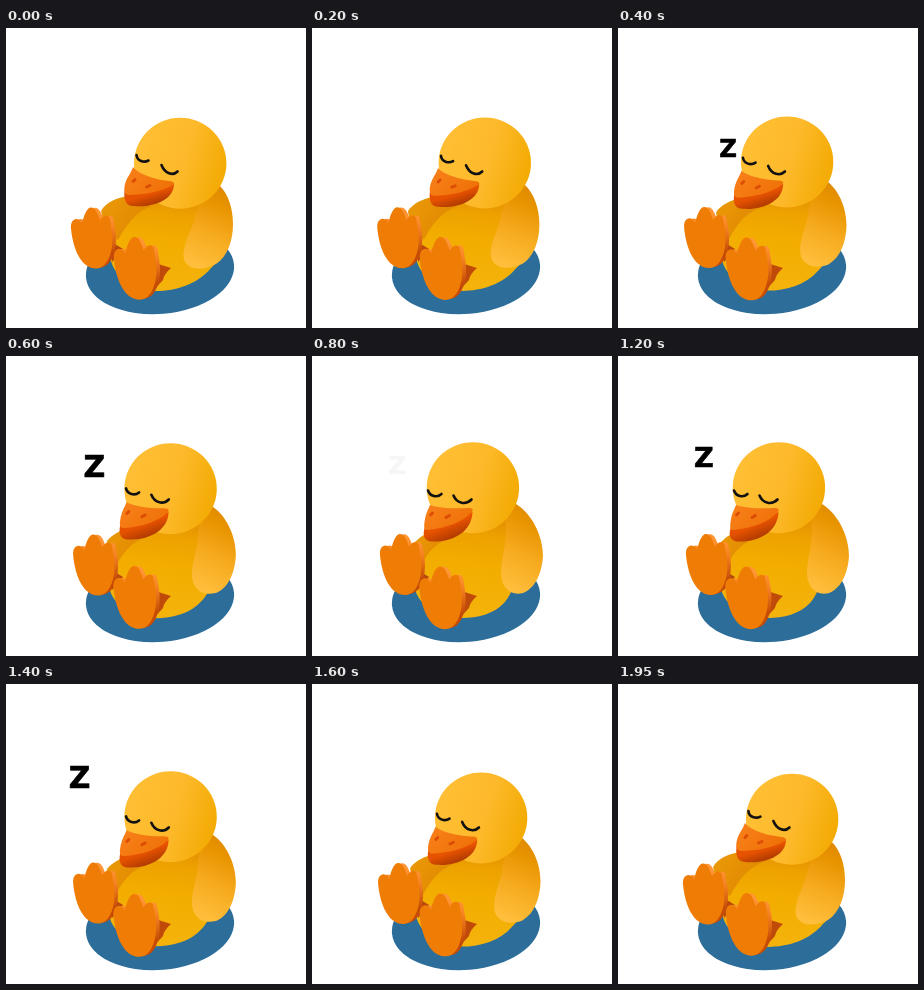
Write an HTML page that moves like this. It is 300x300 px and loops after 2000 ms.

```html
<!DOCTYPE html>
<html lang="en">
<head>
<meta charset="utf-8">
<title>Sleeping duck</title>
<style>
  html, body { margin: 0; width: 100%; height: 100%; overflow: hidden; background: #fff; }
  svg { display: block; width: 100vw; height: 100vh; }
  text {
    font-family: "DejaVu Sans", Verdana, sans-serif; font-weight: 700; text-anchor: middle;
    stroke: #000; stroke-width: .6;
  }
</style>
</head>
<body>
<svg viewBox="0 0 300 300">
  <defs>
    <linearGradient id="bodyFill" x1=".62" y1="0" x2=".5" y2="1">
      <stop offset="0" stop-color="#e28b00"/>
      <stop offset=".22" stop-color="#eda200"/>
      <stop offset=".5" stop-color="#f3ad00"/>
      <stop offset="1" stop-color="#f4b30c"/>
    </linearGradient>
    <linearGradient id="headFill" x1=".1" y1=".35" x2="1" y2=".6">
      <stop offset="0" stop-color="#ffbe33"/>
      <stop offset=".5" stop-color="#fdb92a"/>
      <stop offset="1" stop-color="#f3aa02"/>
    </linearGradient>
    <linearGradient id="wingFill" x1=".65" y1="0" x2=".4" y2="1">
      <stop offset="0" stop-color="#e08900"/>
      <stop offset=".2" stop-color="#e89400"/>
      <stop offset=".6" stop-color="#f7ac20"/>
      <stop offset="1" stop-color="#ffbe3c"/>
    </linearGradient>
    <linearGradient id="armFill" x1="0" y1="0" x2="1" y2=".6">
      <stop offset="0" stop-color="#eb9a08"/>
      <stop offset="1" stop-color="#e08800"/>
    </linearGradient>
    <linearGradient id="billFill" x1="0" y1="0" x2="1" y2=".5">
      <stop offset="0" stop-color="#f9811b"/>
      <stop offset="1" stop-color="#ef7208"/>
    </linearGradient>
    <linearGradient id="lipFill" x1=".2" y1=".4" x2=".6" y2="1">
      <stop offset=".3" stop-color="#e65200"/>
      <stop offset=".8" stop-color="#b63d00"/>
    </linearGradient>
    <linearGradient id="sideFill" x1="0" y1="0" x2="0" y2="1">
      <stop offset=".1" stop-color="#ff9534"/>
      <stop offset=".35" stop-color="#f58220"/>
      <stop offset=".75" stop-color="#c54b06"/>
    </linearGradient>
    <path id="foot" d="M-21-8C-22-18-14-21-10-13C-8-22-5-29-1-29C4-29 6-22 8-16C11-22 18-23 18-16C20-6 21 2 20 10C18 24 12 32 4 32C-10 32-19 14-21-8Z"/>
  </defs>
  <ellipse cx="154" cy="243" rx="74.3" ry="43" fill="#2d6d99" transform="rotate(-5 154 243)"/>
  <g id="duck"></g>
</svg>
<script>
const LOOP = 2000, STEP = 50;
const duck = document.getElementById('duck');
const morphs = [];

function add(tag, attrs) {
  const el = document.createElementNS('http://www.w3.org/2000/svg', tag);
  for (const name in attrs) el.setAttribute(name, attrs[name]);
  return duck.appendChild(el);
}

const mix = (a, b, k) => a + (b - a) * k;
const clamp = v => Math.max(0, Math.min(1, v));
const ramp = (t, from, to) => clamp((t - from) / (to - from));

// A shape that blends between its resting and its leaning outline.
function morph(rest, lean, attrs) {
  const goal = lean.match(/-?[\d.]+/g).map(Number);
  const el = add('path', attrs);
  morphs.push(k => {
    let i = 0;
    el.setAttribute('d', rest.replace(/-?[\d.]+/g, n => mix(+n, goal[i++], k).toFixed(2)));
  });
}

function foot(rest, lean, scale) {
  const side = add('use', { href: '#foot', fill: 'url(#sideFill)' });
  const sole = add('use', { href: '#foot', fill: '#ef7d05' });
  morphs.push(k => {
    const x = mix(rest[0], lean[0], k), y = mix(rest[1], lean[1], k);
    side.setAttribute('transform', `translate(${x + 4} ${y - .3}) scale(${scale * .98})`);
    sole.setAttribute('transform', `translate(${x} ${y}) scale(${scale})`);
  });
}

morph('M112 190C125 168 198 160 214 170C222 205 220 228 205 240C192 256 170 263 150 263C125 262 102 245 104 222C105 205 107 198 112 190Z',
      'M112 190C122 168 185 150 200 158C210 200 206 232 192 247C182 258 165 262 150 262C122 262 100 245 102 222C103 208 106 198 112 190Z',
      { fill: 'url(#bodyFill)' });
morph('M95 183C100 174 112 169 124 168L145 178C128 185 120 198 112 212L100 205Z',
      'M103 186C109 180 115 177 122 174L138 182C126 186 116 195 110 208L102 200Z', { fill: 'url(#armFill)' });
morph('M214 158C222 166 227 180 227 196C227 212 222 228 210 236C200 241 186 244 179 234C174 222 184 206 188 193C191 178 200 162 214 158Z',
      'M204 148C218 156 231 178 231 200C230 216 224 232 211 237C198 240 190 232 189 218C189 202 194 190 194 175C192 160 196 150 204 148Z',
      { fill: 'url(#wingFill)' });

const firstZ = add('text', {});
const secondZ = add('text', {});

add('path', { d: 'M104 213L117 221L106 234Z', fill: '#b9480c' });
add('path', { d: 'M146 234L165 240Q158 246 157 252L146 264Z', fill: '#c04a08' });
foot([86, 208.5], [89, 207], 1);
foot([129.5, 238.8], [129, 240.3], 1.03);

const head = add('ellipse', { rx: 46.2, ry: 45.5, fill: 'url(#headFill)' });
morphs.push(k => {
  head.setAttribute('cx', mix(174.2, 160.9, k));
  head.setAttribute('cy', mix(135.3, 131.7, k));
});

morph('M119 160C117 170 119 178 127 178C147 180 168 172 168 156Z',
      'M113 171C110 179 112 186 121 185.5C142 186 160 175 160.5 156Z', { fill: 'url(#lipFill)' });
morph('M127 139C132 146 150 152 164 153C169 154 169 156 166 157.5C156 163 140 167 122 167C117 166 118 158 120 153C122 148 125 145 127 139Z',
      'M118 149C126 152 144 153 156 152C161 152 162 154 159 157C150 166 135 172 116 174C111 175 112 169 113 163C114 157 116 154 118 149Z',
      { fill: 'url(#billFill)' });

const nostril = { fill: 'none', stroke: '#dc4c04', 'stroke-width': 2.8, 'stroke-linecap': 'round' };
morph('M127 153.5L129 151.5', 'M118.5 159L120.5 157', nostril);
morph('M140.5 159L144 157.5', 'M134 161.5L137.5 159.5', nostril);

const lid = { fill: 'none', stroke: '#111', 'stroke-width': 2.6, 'stroke-linecap': 'round' };
morph('M130.5 127C131 133 138 135 142.5 132.5', 'M116 134.5C118 140.5 125 142 129.5 138', lid);
morph('M155.5 137C159 146 167 148 171.5 143.5', 'M141.5 139.5C145 148 154 149 159.5 143.5', lid);

function placeZ(el, x, y, size, alpha) {
  el.textContent = 'Z';
  el.setAttribute('font-size', size);
  el.setAttribute('x', x);
  el.setAttribute('y', y + size * .3645);
  el.setAttribute('opacity', alpha);
}

function draw(t) {
  const lean = (1 - Math.cos(2 * Math.PI * t / LOOP)) / 2 / .905;
  morphs.forEach(update => update(lean));

  // The first letter slows to a stop, the second one speeds away.
  const left = Math.max(0, (800 - t) / 400) ** 3;
  const size = t < 600 ? mix(24.4, 30, (t - 400) / 200) : mix(30, 25, ramp(t, 600, 800));
  placeZ(firstZ, 85.2 + 25 * left, 108.8 + 11 * left, Math.max(1, size),
    ramp(t, 250, 350) * (1 - ramp(t, 650, 805)));

  const away = ramp(t, 1000, 1550) ** 2;
  placeZ(secondZ, 90 - 31 * away, 103.5 - 19.5 * away, mix(26.3, 33, away),
    ramp(t, 950, 1100) * (1 - ramp(t, 1450, 1600)));
}

const start = performance.now();
function frame() {
  const t = (performance.now() - start) % LOOP;
  draw(Math.floor(t / STEP) * STEP);
  requestAnimationFrame(frame);
}
frame();
</script>
</body>
</html>
```
